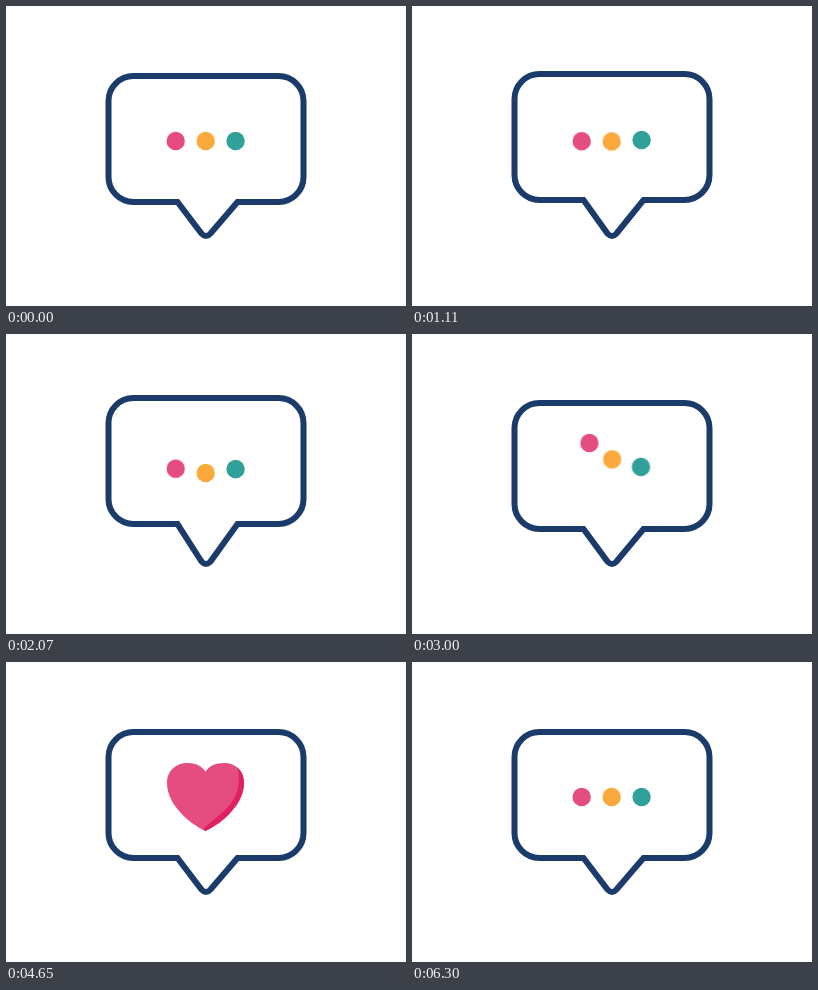
An HTML page without scripts that plays this animation: 400 px wide and 300 px high, repeating every 6330 ms.

```html
<!DOCTYPE html>
<html lang="en">
<head>
<meta charset="utf-8">
<title>Chat bubble</title>
<style>
html, body { margin: 0; width: 100%; height: 100%; overflow: hidden; background: #fff; }
svg { display: block; width: 400px; height: 300px; }

.bubble, .hop, .dot, .heart { animation: 6330ms linear infinite both; }

.bubble { fill: none; stroke: #1b3b6b; stroke-width: 6; animation-name: bubble; }

.hop { animation-name: hop; }
.dot {
  transform-box: fill-box;
  transform-origin: center;
  animation-name: gather;
}
.pink { --x: 30px; fill: #e54d80; }
.orange { --x: 5px; fill: #fba93c; animation-delay: 60ms; }
.teal { --x: -30px; fill: #2fa19a; animation-delay: 120ms; }
.second { animation-delay: 150ms; }
.third { animation-delay: 300ms; }

.heart { transform-origin: 199.5px 140px; animation-name: heart; }

/* body lifts while the tip of the tail stays put */
@keyframes bubble {
  0%, 9.48%, 30.8%, 31.28%, 51.66%, 52.6%, 68.7%, 80.6%, 93.2%, 100% {
    d: path("M127.5 70H272.5a25 25 0 0 1 25 25v76a25 25 0 0 1 -25 25H231.5L204.5 227.5Q200 232.5 195.5 227.5L171.5 196H127.5a25 25 0 0 1 -25 -25v-76a25 25 0 0 1 25 -25z");
    animation-timing-function: ease-out;
  }
  10.9%, 32.7% {
    d: path("M127.5 64H272.5a25 25 0 0 1 25 25v76a25 25 0 0 1 -25 25H231.5L204.5 227.5Q200 232.5 195.5 227.5L171.5 190H127.5a25 25 0 0 1 -25 -25v-76a25 25 0 0 1 25 -25z");
    animation-timing-function: cubic-bezier(.3, .5, .6, .9);
  }
  17.54%, 39.34% {
    d: path("M127.5 68H272.5a25 25 0 0 1 25 25v76a25 25 0 0 1 -25 25H231.5L204.5 227.5Q200 232.5 195.5 227.5L171.5 194H127.5a25 25 0 0 1 -25 -25v-76a25 25 0 0 1 25 -25z");
    animation-timing-function: ease-out;
  }
  21.8%, 47.39%, 84.8% {
    d: path("M127.5 69H272.5a25 25 0 0 1 25 25v76a25 25 0 0 1 -25 25H231.5L204.5 227.5Q200 232.5 195.5 227.5L171.5 195H127.5a25 25 0 0 1 -25 -25v-76a25 25 0 0 1 25 -25z");
  }
  55.45% {
    d: path("M126.5 68.3H273.5a25 25 0 0 1 25 25v78a25 25 0 0 1 -25 25H231.5L204.5 227.5Q200 232.5 195.5 227.5L171.5 196.3H126.5a25 25 0 0 1 -25 -25v-78a25 25 0 0 1 25 -25z");
  }
  61.14% {
    d: path("M126.5 69H273.5a25 25 0 0 1 25 25v77.2a25 25 0 0 1 -25 25H231.5L204.5 227.5Q200 232.5 195.5 227.5L171.5 196.2H126.5a25 25 0 0 1 -25 -25v-77.2a25 25 0 0 1 25 -25z");
    animation-timing-function: ease-in-out;
  }
}

/* two springy jumps */
@keyframes hop {
  0%, 1.42%, 18.96%, 23.22%, 40.76%, 100% {
    transform: none;
    animation-timing-function: cubic-bezier(.37, 0, .63, 1);
  }
  4.27%, 26.07% {
    transform: translateY(-16px);
    animation-timing-function: cubic-bezier(.47, 0, .745, .715);
  }
  6.16%, 27.96%, 10.43%, 32.23% {
    transform: translateY(0);
    animation-timing-function: cubic-bezier(.39, .575, .565, 1);
  }
  8.53%, 30.33% {
    transform: translateY(4px);
    animation-timing-function: cubic-bezier(.47, 0, .745, .715);
  }
  12.8%, 34.6% {
    transform: translateY(-1px);
    animation-timing-function: ease-in-out;
  }
  15.64%, 37.44% {
    transform: translateY(.5px);
    animation-timing-function: ease-in-out;
  }
}

/* dots arc into the middle, then spread again */
@keyframes gather {
  0%, 44.08%, 92.4%, 100% {
    transform: translate(0, 0) scale(1);
    animation-timing-function: cubic-bezier(.32, 0, .67, 0);
  }
  47.39% {
    transform: translate(calc(var(--x) * .25), -26px) scale(1);
    animation-timing-function: ease-out;
  }
  49.29% {
    transform: translate(calc(var(--x) * .63), -29px) scale(1);
    animation-timing-function: ease-in;
  }
  51.66% { transform: translate(var(--x), 0) scale(1); }
  52.13%, 85.8% { transform: translate(var(--x), 0) scale(0); }
  86.7% {
    transform: translate(calc(var(--x) * .8), 0) scale(1);
    animation-timing-function: ease-out;
  }
  90.05% {
    transform: translate(calc(var(--x) * -.1), 0) scale(1);
    animation-timing-function: ease-in-out;
  }
}

@keyframes heart {
  0%, 51.18%, 86.7%, 100% {
    transform: scale(0);
    animation-timing-function: ease-out;
  }
  55.45% { transform: scale(1.1); animation-timing-function: ease-in-out; }
  61.14% { transform: translateY(1px) scale(.932); animation-timing-function: ease-in-out; }
  66.35% { transform: scale(1.04); animation-timing-function: ease-in-out; }
  73.46% { transform: scale(1); animation-timing-function: ease-in-out; }
  79.6% { transform: scale(.95); animation-timing-function: ease-in-out; }
  84.4% { transform: scale(1.05); animation-timing-function: ease-in; }
}
</style>
</head>
<body>
<svg viewBox="0 0 400 300" aria-label="Speech bubble with three dots that turn into a heart">
  <path class="bubble" d="M127.5 70H272.5a25 25 0 0 1 25 25v76a25 25 0 0 1 -25 25H231.5L204.5 227.5Q200 232.5 195.5 227.5L171.5 196H127.5a25 25 0 0 1 -25 -25v-76a25 25 0 0 1 25 -25z"/>
  <g class="hop third"><circle class="dot teal" cx="229.6" cy="135" r="9.2"/></g>
  <g class="hop second"><circle class="dot orange" cx="199.7" cy="135" r="9.2"/></g>
  <g class="hop"><circle class="dot pink" cx="169.7" cy="135" r="9.2"/></g>
  <g class="heart">
    <path fill="#e54d80" d="M199.5 169C190 165 161 146 161 121C161 108 171 101 181 101C190 101 196 104.5 199.5 109.5C203 104.5 209 101 218.5 101C229 101 238 108 238 121C238 146 209 165 199.5 169z"/>
    <path fill="#e0205f" d="M231.5 106C235 120 232 134 222 145C214 154 203 160 197 167.8L199.5 169C209 165 238 146 238 121C238 114 235.5 109 231.5 106z"/>
  </g>
</svg>
</body>
</html>
```
